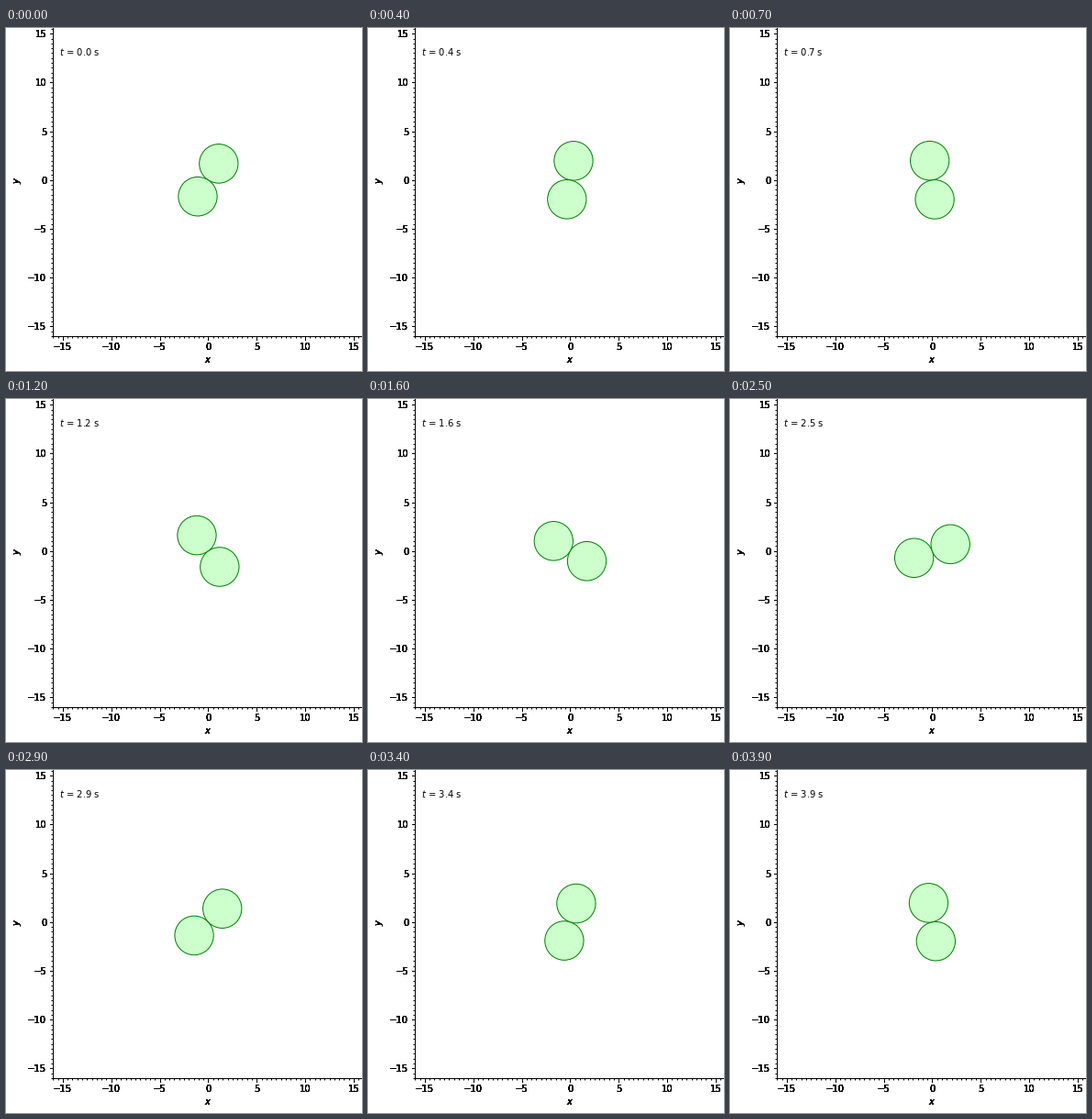
Write a matplotlib script that moves like this. It is 388 px wide and 374 px high and loops after 4000 ms.

```python
import math

import matplotlib.pyplot as plt
from matplotlib.animation import FuncAnimation
from matplotlib.patches import Circle
from matplotlib.ticker import MultipleLocator

W, H, DPI = 388, 374, 72
FRAMES, STEP = 40, 100            # frame count, ms per frame
CX, CY = 220.4, 165.8             # pixel position of the data origin
SX, SY = 10.57, 10.64             # pixels per data unit
LIM = 16
RADIUS = 2
OVERDRAW = 7                      # repeated label passes make the text heavy

plt.rcParams.update({"font.family": "DejaVu Sans", "font.size": 10})

# The small margin keeps the pixel size from rounding down.
fig = plt.figure(figsize=((W + 0.01) / DPI, (H + 0.01) / DPI), dpi=DPI,
                 facecolor="white")


def make_axes(minor):
    """Axes that run slightly past the top and right edges of the figure."""
    rect = [(CX - LIM * SX) / W, (H - CY - LIM * SY) / H,
            2 * LIM * SX / W, 2 * LIM * SY / H]
    ax = fig.add_axes(rect, facecolor="none", label=f"layer{len(fig.axes)}")
    ax.set(xlim=(-LIM, LIM), ylim=(-LIM, LIM), xlabel="$x$", ylabel="$y$")
    for axis in (ax.xaxis, ax.yaxis):
        axis.set_major_locator(MultipleLocator(5))
        if minor:
            axis.set_minor_locator(MultipleLocator(0.5))
    ax.tick_params(which="major", length=3.5, width=1, pad=3.5)
    ax.tick_params(which="minor", length=2, width=1)
    for spine in ax.spines.values():
        spine.set_linewidth(1)
    return ax


ax = make_axes(minor=True)
for _ in range(OVERDRAW):
    make_axes(minor=False)

balls = [ax.add_patch(Circle((0, 0), RADIUS, facecolor="#ccffcc",
                             edgecolor="green", linewidth=1))
         for _ in range(2)]
clock = ax.text(0.02, 0.9, "", transform=ax.transAxes)


def update(frame):
    t = frame * STEP / 1000
    angle = 1 + t                 # one radian per second
    x, y = RADIUS * math.cos(angle), RADIUS * math.sin(angle)
    balls[0].center = (x, y)
    balls[1].center = (-x, -y)
    clock.set_text(f"$t$ = {t:.1f} s")
    return [*balls, clock]


anim = FuncAnimation(fig, update, frames=FRAMES, interval=STEP,
                     repeat=True, repeat_delay=0)
plt.show()
```
